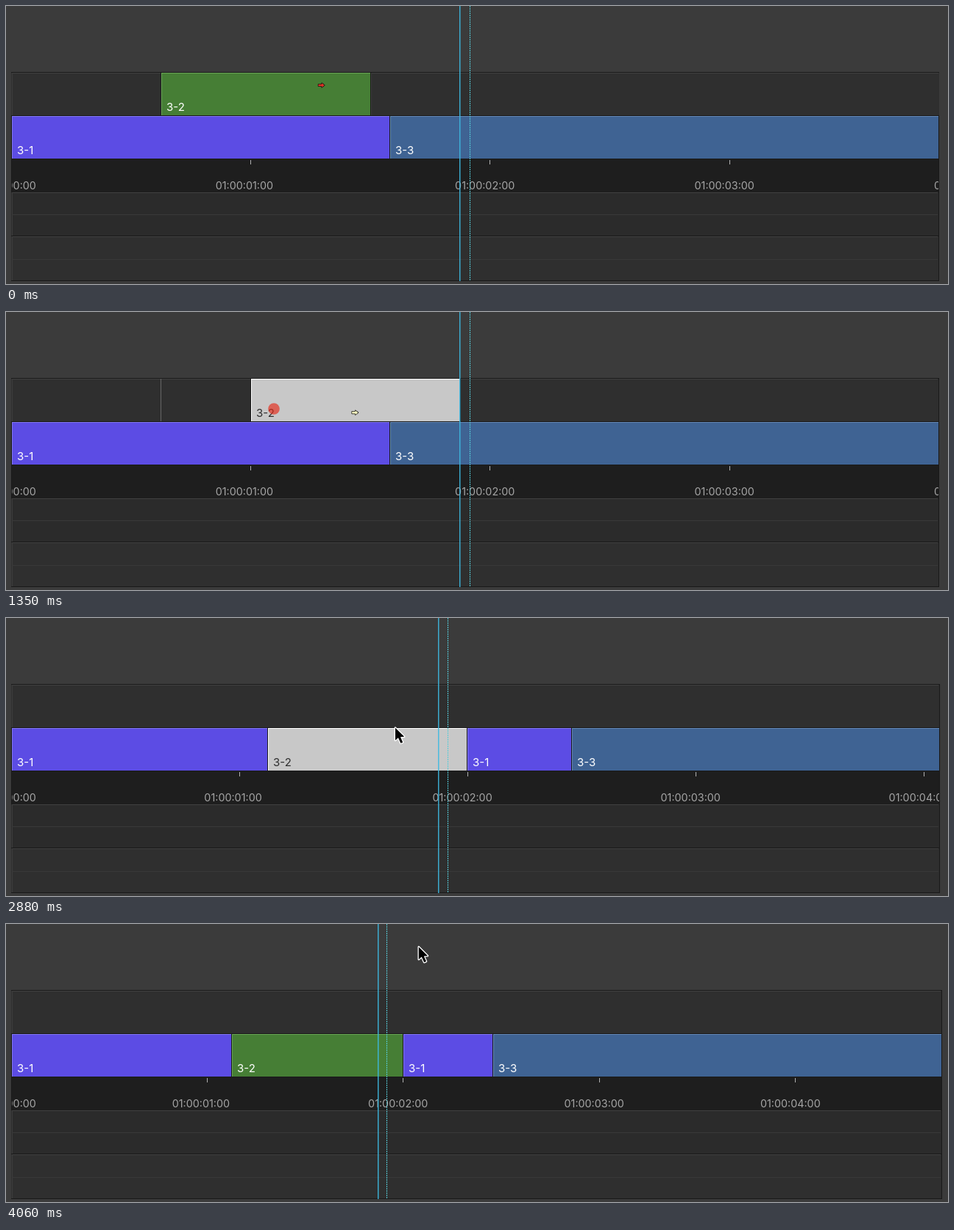
These frames come from a looping animation (1280 px wide and 379 px high, 6.35 s). An HTML page with a canvas:

```html
<!DOCTYPE html>
<html lang="en">
<head>
<meta charset="utf-8">
<title>Timeline insert edit</title>
<style>
html, body { margin: 0; width: 100%; height: 100%; overflow: hidden; background: #3b3b3b; }
canvas { display: block; width: 1280px; height: 379px; }
</style>
</head>
<body>
<canvas id="stage" width="1280" height="379"></canvas>
<script>
const ctx = document.getElementById('stage').getContext('2d');
const LOOP = 6350, FPS = 17, ORIGIN = 7;
const FONT = 'Inter, "Liberation Sans", sans-serif';
const COLORS = {
  green: ['#467e35', '#68a655', '#fff'],
  purple: ['#5c4ce4', '#8177ef', '#fff'],
  blue: ['#3f6393', '#6488b5', '#fff'],
  grey: ['#c8c8c8', '#fff', '#2e2e2e']
};

// Keys are [time, ...values]
const CURSOR = [[820, 349, 143], [1000, 364, 132], [1350, 474, 137], [1940, 517, 171], [2240, 517, 190]];
const POINTER = [[2820, 517, 190], [3060, 560, 30]];
const CLIP_X = [[1000, 211], [1290, 330], [1350, 333], [1470, 333], [1820, 373]];
const VIEW = [[2820, 325.4, 1267], [3060, 266.4, 1271]];

const clamp = v => Math.max(0, Math.min(1, v));

function at(keys, t) {
  let i = 0;
  while (i < keys.length - 2 && t > keys[i + 1][0]) i++;
  const [t0, ...a] = keys[i], [t1, ...b] = keys[i + 1];
  const p = clamp((t - t0) / (t1 - t0));
  return a.map((v, k) => v + (b[k] - v) * p);
}

function rect(x, y, w, h, color) {
  ctx.fillStyle = color;
  ctx.fillRect(x, y, w, h);
}

function text(str, x, y, color, size) {
  ctx.font = `${size}px ${FONT}`;
  ctx.fillStyle = color;
  ctx.fillText(str, x, y);
}

function poly(points, fill, stroke, width) {
  ctx.beginPath();
  points.forEach(([x, y]) => ctx.lineTo(x, y));
  ctx.closePath();
  ctx.lineWidth = width;
  ctx.lineJoin = 'round';
  ctx.strokeStyle = stroke;
  ctx.stroke();
  ctx.fillStyle = fill;
  ctx.fill();
}

// Neighbouring clips share a one pixel gap
function clip(label, x0, x1, y, kind) {
  const [fill, edge, ink] = COLORS[kind];
  const x = Math.round(x0), w = Math.round(x1) - x - 1;
  rect(x - 1, y - 1, w + 2, 60, '#191919');
  rect(x, y, w, 58, fill);
  rect(x, y, w, 1, edge);
  rect(x, y, 1, 58, edge);
  text(label, x + 7, y + 52, ink, 15);
}

function lane(y, h, right, color, middle) {
  rect(7, y, right - 7, h, color);
  rect(8, y, right - 9, 1, '#414141');
  rect(8, y, 1, h, '#3d3d3d');
  if (middle) rect(8, middle, right - 9, 1, '#393939');
}

function ruler(scale, right) {
  ctx.save();
  ctx.beginPath();
  ctx.rect(8, 209, right - 8, 45);
  ctx.clip();
  for (let s = 0; s < 6; s++) {
    const x = ORIGIN + s * scale;
    if (s) rect(Math.round(x - 0.5), 210, 1, 6, '#b0b0b0');
    text(`01:00:0${s}:00`, x - 47.7, 250, '#a5a5a5', 14.35);
  }
  ctx.restore();
}

function playheads(scale) {
  const x = ORIGIN + 1.8735 * scale;
  const dotted = Math.round(ORIGIN + 1.914 * scale);
  rect(Math.round(x) - 1, 0, 1.5, 375, 'rgba(62,184,224,.9)');
  for (let y = 0; y < 375; y += 3) rect(dotted, y, 1, 2, '#55cbd8');
}

function ripple(x, y, t, start, release) {
  const fall = clamp((t - release) / 480);
  const r = t < release ? 32 * clamp((t - start) / 226) : 32 * (1 - fall) ** 2;
  if (t < start || r < 0.2) return;
  ctx.globalAlpha = 1 - 0.7 * fall;
  ctx.fillStyle = '#e42616';
  ctx.beginPath();
  ctx.arc(x, y, r, 0, Math.PI * 2);
  ctx.fill();
  ctx.globalAlpha = 1;
}

function toolCursor(t) {
  let [x, y] = at(CURSOR, t);
  if (t < 820) {
    const p = 1 - (1 - t / 820) ** 1.4;
    x = 428.5 - 79.5 * p;
    y = 108 + 35 * p;
  }
  ctx.save();
  ctx.translate(x, y);
  if ((t > 700 && t < 940) || (t > 1800 && t < 2060)) {
    rect(-5, -1.5, 5, 3, '#111');
    rect(-3.5, -0.5, 1, 1, '#f4f4c8');
    poly([[-0.5, 0], [3, -2.2], [4, -1], [4, 1], [3, 2.2]], '#f7f6cf', '#111', 1.3);
  } else {
    poly([[-4, -1.3], [0.5, -1.3], [0.5, -2.8], [4.3, 0], [0.5, 2.8], [0.5, 1.3], [-4, 1.3]],
      t < 50 ? '#dc3324' : '#f3f2bd', '#141414', 1.5);
  }
  ctx.restore();
}

function pointer(t) {
  const [x, y] = at(POINTER, t);
  ctx.save();
  ctx.translate(x, y);
  poly([[0.8, 1.2], [0.8, 18.3], [4.8, 14.7], [8.2, 22.2], [11, 21], [7.8, 13.7], [13, 13.4]],
    '#000', '#fff', 2.6);
  ctx.restore();
}

function draw(t) {
  const [scale, right] = at(VIEW, t);
  const px = s => ORIGIN + 1 + s * scale;
  const lifted = t >= 1000, inserted = t >= 2050, dropped = t >= 2870;
  const cut = 1.1225, clipEnd = 1.9963, tail = 2.454, half = 1.58;

  rect(0, 0, 1280, 379, '#3b3b3b');
  rect(7, 90, right - 6, 285, '#191919');
  lane(91, 58, lifted ? right : right + 1, '#2f2f2f');
  rect(8, 208, right - 8, 46, '#1e1e1e');
  lane(254, 59, right, '#2b2b2b', 284);
  lane(314, 60, right, '#2f2f2f', 345);

  if (!lifted) {
    clip('3-2', 211, 496, 91, 'green');
    rect(496, 91, 1, 58, '#3d3d3d');
  } else if (!dropped) {
    rect(210, 91, 1, 58, '#656565');
    if (inserted) {
      rect(984, 91, 1, 58, '#191919');
      rect(985, 91, 1, 58, '#3d3d3d');
    }
  }

  if (inserted) {
    clip('3-1', px(0), px(cut), 150, 'purple');
    clip('3-2', px(cut), px(clipEnd), 150, t >= 3400 ? 'green' : 'grey');
    clip('3-1', px(clipEnd), px(tail), 150, 'purple');
    clip('3-3', px(tail), dropped ? right + 1 : 1282, 150, 'blue');
  } else {
    clip('3-1', px(0), px(half), 150, 'purple');
    clip('3-3', px(half), right + 1, 150, 'blue');
    if (lifted) {
      const [x] = at(CLIP_X, t);
      clip('3-2', x, x + 285, 91, 'grey');
    }
  }

  ruler(scale, right);
  playheads(scale);
  ripple(364, 132, t, 884, 1110);
  ripple(560, 32, t, 3233, 3580);
  if (dropped) pointer(t);
  else toolCursor(t);
}

function frame(now) {
  const t = now % LOOP;
  draw(Math.floor((t + 5) * FPS / 1000) * 1000 / FPS);
  requestAnimationFrame(frame);
}
requestAnimationFrame(frame);
</script>
</body>
</html>
```
